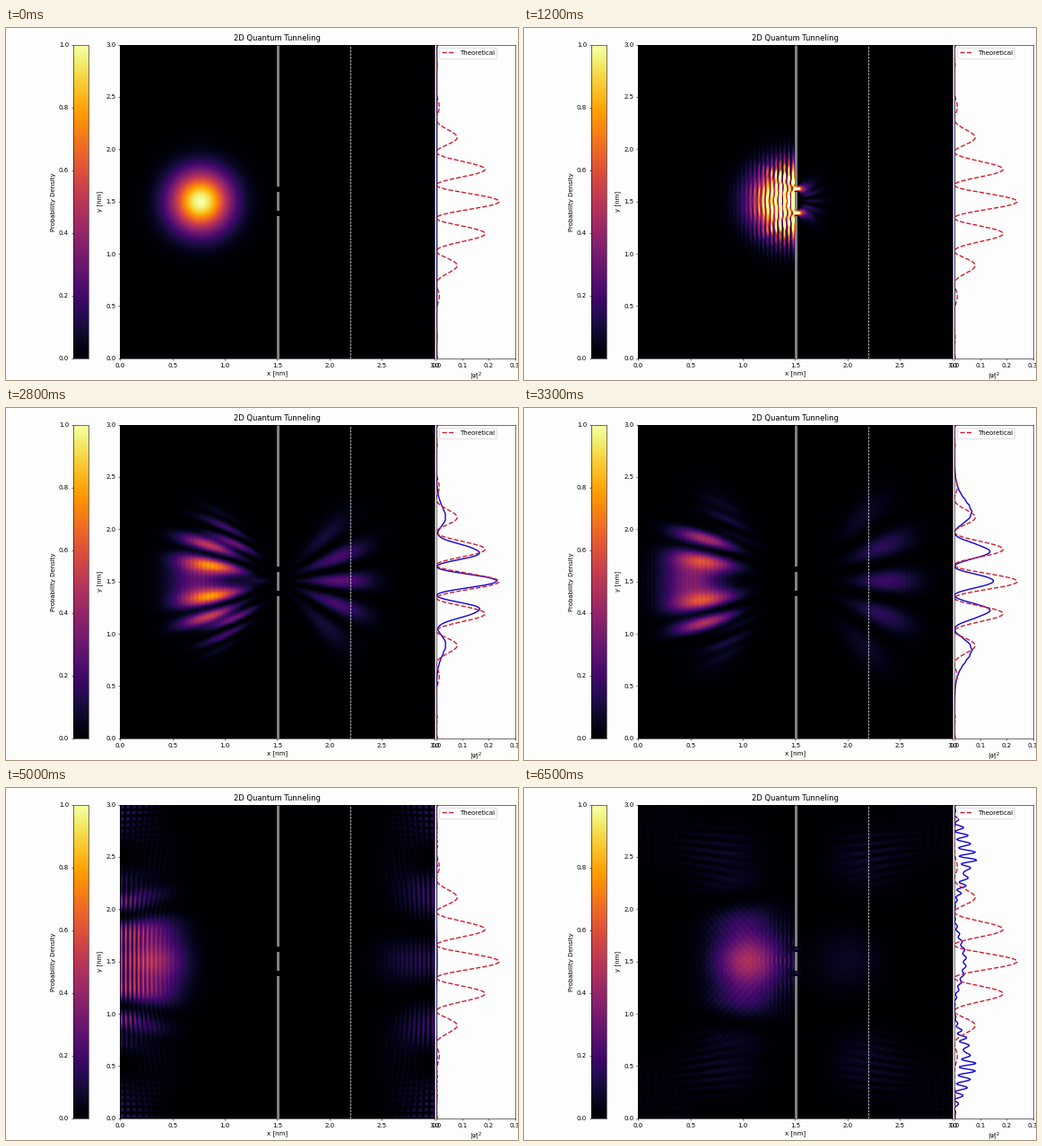
A matplotlib script for the animation above (6600 ms loop, 571 px wide and 393 px high).

```python
import numpy as np
import matplotlib.pyplot as plt
from matplotlib.animation import FuncAnimation
from matplotlib.patches import Rectangle

W, H, DPI = 571, 393, 50
FRAMES, INTERVAL = 66, 100
PAPER, RED, BLUE = "#fdfdfd", "#d01c2c", "#1000d8"

# Box and wave packet, lengths in nm
SIZE, N = 3.0, 299
DX = SIZE / N
WAVELENGTH = 0.0813
K = 2 * np.pi / WAVELENGTH
SIGMA, X0, Y0 = 0.2, 0.77, 1.5
FRAME_TIME, SUBSTEPS = 7.24e-4, 40

# Double slit, in grid cells
WALL = (149, 152)
BARS = ((0, 136), (141, 159), (164, N))
SCREEN, SCREEN_CELL = 2.2, 220
SLIT_WIDTH, SLIT_GAP, SLIT_TO_SCREEN = 0.05, 0.18, 0.7


def simulate():
    """Leapfrog solution of the Schroedinger equation with hard walls."""
    dt = FRAME_TIME / SUBSTEPS
    hop = np.float32(dt / (2 * DX**2))
    free = np.ones((N, N), np.float32)
    for lo, hi in BARS:
        free[lo:hi, WALL[0]:WALL[1]] = 0
    weight = hop * free

    centers = (np.arange(N) + 0.5) * DX
    x, y = np.meshgrid(centers - X0, centers - Y0)
    envelope = free * np.exp(-(x**2 + y**2) / (4 * SIGMA**2))
    re, im = np.zeros((2, N + 2, N + 2), np.float32)
    inner = (slice(1, -1), slice(1, -1))
    re[inner] = envelope * np.cos(K * x)
    im[inner] = envelope * np.sin(K * x)
    near, own = np.empty_like(free), np.empty_like(free)

    def energy(a):
        np.add(a[2:, 1:-1], a[:-2, 1:-1], out=near)
        np.add(near, a[1:-1, 2:], out=near)
        np.add(near, a[1:-1, :-2], out=near)
        np.multiply(a[inner], np.float32(4), out=own)
        np.subtract(own, near, out=own)
        return np.multiply(own, weight, out=own)

    density = [re[inner]**2 + im[inner]**2]
    for _ in range(FRAMES - 1):
        for _ in range(SUBSTEPS):
            re[inner] += energy(im)
            im[inner] -= energy(re)
        density.append(re[inner]**2 + im[inner]**2)
    return density


density = simulate()

# Set the brightness of the transmitted wave at its passage of the screen
gain = 0.23 / density[28][:, SCREEN_CELL].max()
for rho in density:
    rho[:, WALL[1]:] *= gain


def theory(y):
    s = (y - 1.5) / (WAVELENGTH * SLIT_TO_SCREEN)
    return (0.24 * np.sinc(SLIT_WIDTH * s)**2
            * np.cos(np.pi * SLIT_GAP * s)**2)


fig = plt.figure(figsize=(W / DPI, H / DPI), dpi=DPI, facecolor=PAPER)


def add_axes(left, width):
    top, height = 18.6, 350.2
    box = [left / W, 1 - (top + height) / H, width / W, height / H]
    return fig.add_axes(box, facecolor=PAPER)


cax = add_axes(74.9, 17.5)
ax = add_axes(127.3, 350.3)
side = add_axes(479.9, 87.6)

image = ax.imshow(density[0], cmap="inferno", vmin=0, vmax=1, origin="lower",
                  extent=(0, SIZE, 0, SIZE), aspect="auto")
ax.axvline(SCREEN, color="white", ls="--", lw=1)
for lo, hi in BARS:
    ax.add_patch(Rectangle((WALL[0] * DX, lo * DX), (WALL[1] - WALL[0]) * DX,
                           (hi - lo) * DX, facecolor="gray",
                           edgecolor="none"))
ax.set(xlim=(0, SIZE), ylim=(0, SIZE), xlabel="x [nm]", ylabel="y [nm]",
       title="2D Quantum Tunneling")

fig.colorbar(image, cax=cax, ticklocation="left", label="Probability Density")

heights = np.linspace(0, SIZE, N)
curve, = side.plot(density[0][:, SCREEN_CELL], heights, color=BLUE, lw=2)
fine = np.linspace(0, SIZE, 900)
side.plot(theory(fine), fine, color=RED, ls="--", lw=2, label="Theoretical")
side.set(xlim=(0, 0.3), ylim=(0, SIZE), xlabel=r"$|\psi|^2$",
         xticks=[0, 0.1, 0.2, 0.3], yticks=[])
side.legend(loc="upper left")


def update(i):
    image.set_data(density[i])
    curve.set_xdata(density[i][:, SCREEN_CELL])
    return image, curve


anim = FuncAnimation(fig, update, frames=FRAMES, interval=INTERVAL,
                     repeat=True, repeat_delay=0)
plt.show()
```
